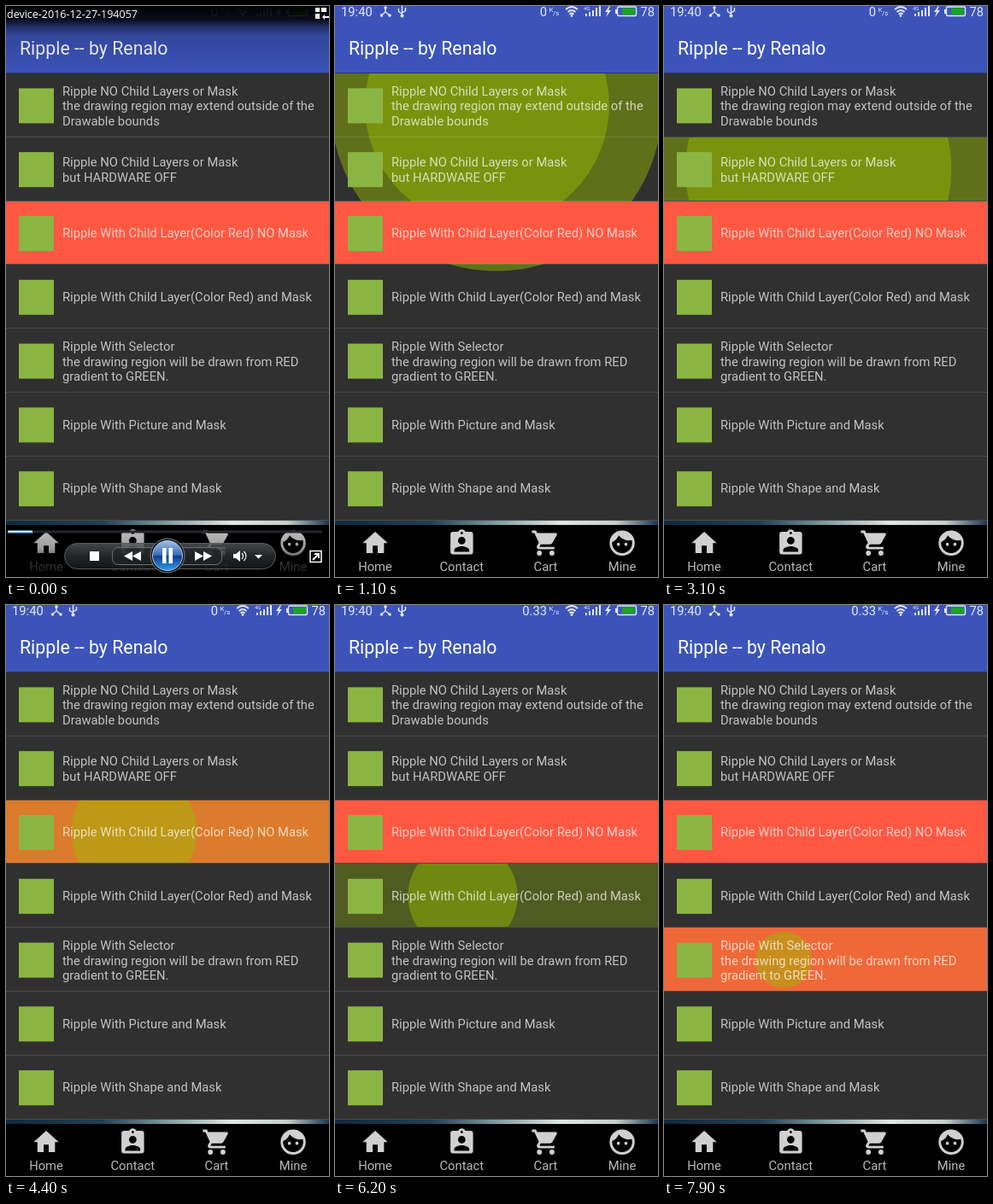
An HTML page that plays this animation: 378x669 px, repeating every 8000 ms.

```html
<!DOCTYPE html>
<html lang="en">
<head>
<meta charset="utf-8">
<title>Ripple list</title>
<style>
html, body { margin: 0; width: 100%; height: 100%; overflow: hidden; background: #000; }
svg { display: block; width: 378px; height: 669px; }
text { font-family: Roboto, sans-serif; font-size: 14.75px; white-space: pre; }
.row { fill: #fff; fill-opacity: .7; }
.nav { fill: #d0d0d0; }
.nav text { text-anchor: middle; fill: #b8b8b8; }
.status { fill: #e4e8fa; }
.line { fill: none; stroke: #e4e8fa; stroke-width: 1.4; }
.caption { font: 12.5px "Open Sans", "Noto Sans", sans-serif; fill: #fff; }
</style>
</head>
<body>
<svg id="stage" viewBox="0 0 378 669">
  <defs>
    <linearGradient id="photo">
      <stop offset="0" stop-color="#10283f"/><stop offset=".3" stop-color="#1f4256"/>
      <stop offset=".5" stop-color="#7f9ca0"/><stop offset=".7" stop-color="#dfe8e2"/>
      <stop offset=".87" stop-color="#c3d0cb"/><stop offset="1" stop-color="#1a3550"/>
    </linearGradient>
    <linearGradient id="topShade" x2="0" y2="1">
      <stop offset="0" stop-opacity=".98"/><stop offset=".2" stop-opacity=".86"/>
      <stop offset=".32" stop-opacity=".4"/><stop offset=".45" stop-opacity=".16"/>
      <stop offset="1" stop-opacity="0"/>
    </linearGradient>
    <linearGradient id="bottomShade" x2="0" y2="1">
      <stop offset="0" stop-opacity=".05"/><stop offset=".45" stop-opacity=".25"/>
      <stop offset=".75" stop-opacity=".72"/><stop offset="1" stop-opacity=".85"/>
    </linearGradient>
    <linearGradient id="pill" x2="0" y2="1">
      <stop offset="0" stop-color="#54585c"/><stop offset=".5" stop-color="#2b2e31"/>
      <stop offset="1" stop-color="#17191b"/>
    </linearGradient>
    <linearGradient id="pauseFill" x2="0" y2="1">
      <stop offset="0" stop-color="#9fc0e8"/><stop offset=".48" stop-color="#3a6cb4"/>
      <stop offset=".52" stop-color="#123d8c"/><stop offset="1" stop-color="#2fa0e6"/>
    </linearGradient>
  </defs>

  <rect width="378" height="669" fill="#303030"/>
  <g id="list"></g>

  <rect width="378" height="79" fill="#3c54ba"/>
  <rect y="78" width="378" height="1" fill="#26356f"/>
  <text x="16" y="57" fill="#fff" style="font-size:21.3px">Ripple -- by Renalo</text>

  <g class="status">
    <text x="7" y="11.5">19:40</text>
    <path class="line" d="M59 1v6l-5 4M59 7l5 4"/>
    <circle cx="59" cy="2" r="1.8"/><circle cx="54.5" cy="11" r="1.8"/><circle cx="64" cy="11" r="1.8"/>
    <path class="line" d="M78.5 0v12M74.5 3v3.5l4 2.5M82.5 2v3.5l-4 2.5"/>
    <circle cx="78.5" cy="11.5" r="2"/>
    <text id="speed" x="248" y="11.5" text-anchor="end">0</text>
    <text x="250.5" y="7" style="font-size:8px">K</text>
    <text x="255" y="11" style="font-size:8px">/s</text>
    <path class="line" style="stroke-width:1.8" d="M270 4q7-6 14 0M272.500 7q4.500-4 9 0M274.500 9.500q2.500-2 5 0"/>
    <circle cx="277" cy="11.5" r="1.4"/>
    <text x="291" y="5" style="font-size:6px">4G</text>
    <path d="M293 9h2v3h-2zM297 7h2v5h-2zM301 5h2v7h-2zM305 2h2v10h-2zM309 0h2v12h-2z"/>
    <path d="M321 0l-5 7h3l-2 6 6-8h-3l2-5z"/>
    <rect x="330.5" y="1" width="22" height="10.5" rx="1.5" class="line"/>
    <rect x="328" y="4" width="2" height="5"/>
    <rect x="336" y="2.5" width="15" height="7.5" fill="#19a51e"/>
    <text x="357.5" y="11.5">78</text>
  </g>

  <rect y="603" width="378" height="5" fill="url(#photo)"/>
  <rect y="608" width="378" height="61" fill="#000"/>
  <g id="nav" class="nav"></g>

  <g id="player">
    <rect width="378" height="79" fill="url(#topShade)"/>
    <rect y="608" width="378" height="61" fill="url(#bottomShade)"/>
    <text class="caption" x="1" y="13.5">device-2016-12-27-194057</text>
    <path fill="#fff" d="M362 2h5v5h-5zM369 2h6v5h-6zM362 9h5v6h-5zM370 13l3-3v2h5v2h-5v2z"/>
    <rect x="2" y="614.5" width="368" height="3" fill="#24282c"/>
    <rect x="2" y="614.5" width="29" height="3" fill="#7fc4f2"/>
    <rect x="2" y="615" width="29" height="1" fill="#fff"/>
    <rect x="68.5" y="629.5" width="247" height="30" rx="15" fill="url(#pill)" fill-opacity=".8" stroke="#555a5f"/>
    <rect x="124.5" y="634.5" width="128" height="20" rx="7" fill="#1f2326" fill-opacity=".6" stroke="#6b7075"/>
    <circle cx="189" cy="644" r="20" fill="#14181d" stroke="#777d84"/>
    <circle cx="189" cy="644" r="17.5" fill="url(#pauseFill)" stroke="#a9c6e8"/>
    <path fill="#fff" d="M183 635h4.500v18h-4.500zM190.500 635h4.500v18h-4.500zM98 639h11v11h-11z
      M148 639v11l-10-5.500zM158 639v11l-10-5.500zM221 639v11l10-5.500zM231 639v11l10-5.500z
      M266 642h3l5-4v13l-5-4h-3zM291 643h9l-4.500 4.500z"/>
    <path d="M276 641q3 3.500 0 7M278.500 639q5 5.500 0 11" fill="none" stroke="#fff" stroke-width="1.2"/>
    <path d="M356 638.500h13v13h-13z" fill="none" stroke="#fff" stroke-width="1.5"/>
    <path d="M359 649l6-6m-4-1h5v5" fill="none" stroke="#fff" stroke-width="1.8"/>
  </g>
</svg>
<script>
const LOOP = 8000, TOP = 79, PITCH = 74.8, WIDTH = 378;
const RED = '#ff5842', RIPPLE = '#99bb00';
const FULL_RADIUS = 194, SPEED = 0.183, FADE_IN = 520, FADE_OUT = 500, LAYER_ALPHA = 0.46;

const ROWS = [
  ['Ripple NO Child Layers or Mask', 'the drawing region may extend outside of the', 'Drawable bounds'],
  ['Ripple NO Child Layers or Mask', 'but HARDWARE OFF'],
  ['Ripple With Child Layer(Color Red) NO Mask'],
  ['Ripple With Child Layer(Color Red) and Mask'],
  ['Ripple With Selector', 'the drawing region will be drawn from RED', 'gradient to GREEN.'],
  ['Ripple With Picture and Mask'],
  ['Ripple With Shape and Mask']
];

// One press per row: touch x, press time, release time
const PRESSES = [
  { x: 147, down: 320, up: 1400 },
  { x: 147, down: 2250, up: 3200 },
  { x: 126, down: 4000, up: 5200 },
  { x: 130, down: 5850, up: 7150 },
  { x: 130, down: 7720, up: 9000 }
];

const NAV = [
  [47, 'Home', 'M10 20v-6h4v6h5v-8h3L12 3 2 12h3v8z'],
  [148.3, 'Contact', 'M19 3h-4.2a3 3 0 0 0-5.6 0H5a2 2 0 0 0-2 2v14a2 2 0 0 0 2 2h14a2 2 0 0 0 2-2V5a2 2 0 0 0-2-2z' +
    'M12 3a1 1 0 1 1 0 2 1 1 0 1 1 0-2zM12 7a3 3 0 1 1 0 6 3 3 0 1 1 0-6zM18 19H6v-1.4c0-2 4-3.1 6-3.1s6 1.1 6 3.1z'],
  [246.5, 'Cart', 'M7 18a2 2 0 1 0 0 4 2 2 0 1 0 0-4zM17 18a2 2 0 1 0 0 4 2 2 0 1 0 0-4z' +
    'M1 2v2h2l3.6 7.6-1.4 2.4A2 2 0 0 0 7 17h12v-2H7.4l-.2-.4.9-1.6h7.5c.7 0 1.4-.4 1.7-1l3.6-6.5A1 1 0 0 0 20 4H5.2l-.9-2z'],
  [336, 'Mine', 'M9 11.75a1.25 1.25 0 1 0 0 2.5 1.25 1.25 0 1 0 0-2.5zM15 11.75a1.25 1.25 0 1 0 0 2.5 1.25 1.25 0 1 0 0-2.5z' +
    'M12 2a10 10 0 1 0 0 20 10 10 0 1 0 0-20zM12 20a8 8 0 0 1-8-8.9c2.4-1 4.3-2.9 5.3-5.3a10 10 0 0 0 10.4 3.9A8 8 0 0 1 12 20z']
];

const $ = id => document.getElementById(id);
const clamp = v => Math.min(1, Math.max(0, v));
const rowTop = i => Math.round(TOP + PITCH * i);
const rowMid = i => TOP + PITCH * (i + .5);

function add(parent, tag, attrs, text) {
  const el = document.createElementNS('http://www.w3.org/2000/svg', tag);
  for (const key in attrs) el.setAttribute(key, attrs[key]);
  if (text) el.textContent = text;
  parent.append(el);
  return el;
}

function addBackground(lines, i) {
  const list = $('list'), mid = rowMid(i);
  const box = { x: 0, y: rowTop(i), width: WIDTH, height: rowTop(i + 1) - rowTop(i) - 1 };
  const press = PRESSES[i];
  if (i === 2) add(list, 'rect', { ...box, fill: RED });
  if (!press) return;
  if (i === 4) press.selected = add(list, 'rect', { ...box, fill: RED });
  const group = add(list, 'g', { fill: RIPPLE });
  // The first row has no bounds, so its ripple spills over its neighbours
  if (i > 0) {
    add(add(list, 'clipPath', { id: 'clip' + i }), 'rect', box);
    group.setAttribute('clip-path', `url(#clip${i})`);
  }
  press.back = add(group, 'circle', { cx: WIDTH / 2, cy: mid, r: FULL_RADIUS });
  press.front = add(group, 'circle', { cy: mid });
}

function addContent(lines, i) {
  const list = $('list'), mid = rowMid(i);
  add(list, 'rect', { y: rowTop(i + 1) - 1, width: WIDTH, height: 1, fill: '#fff', 'fill-opacity': .13 });
  add(list, 'rect', { x: 15, y: mid - 20, width: 41, height: 41, fill: '#8bb543' });
  const first = mid + 5.2 - (lines.length - 1) * 8.3;
  lines.forEach((line, k) => add(list, 'text', { class: 'row', x: 66, y: first + k * 17.4 }, line));
}

ROWS.forEach(addBackground);
ROWS.forEach(addContent);
for (const [x, label, d] of NAV) {
  add($('nav'), 'path', { d, 'fill-rule': 'evenodd', transform: `translate(${x - 17.6} 611.6) scale(1.47)` });
  add($('nav'), 'text', { x, y: 661.5 }, label);
}

function drawPress(p, t) {
  const age = t - p.down;
  const fade = age < 0 ? 0 : 1 - clamp((t - p.up) / FADE_OUT);
  const grown = clamp(age * SPEED / FULL_RADIUS);
  p.back.setAttribute('opacity', LAYER_ALPHA * clamp(age / FADE_IN) * fade);
  p.front.setAttribute('opacity', LAYER_ALPHA * fade);
  p.front.setAttribute('r', grown * FULL_RADIUS);
  p.front.setAttribute('cx', p.x + (WIDTH / 2 - p.x) * grown);
  if (p.selected) p.selected.setAttribute('opacity', age >= 0 ? 1 : 0);
}

function draw(now) {
  const t = now % LOOP;
  PRESSES.forEach(p => drawPress(p, t));
  $('player').setAttribute('opacity', 1 - clamp((t - 200) / 750));
  $('speed').textContent = t < 5000 ? '0' : '0.33';
}

const start = performance.now();
function tick() {
  draw(performance.now() - start);
  requestAnimationFrame(tick);
}
tick();
</script>
</body>
</html>
```
